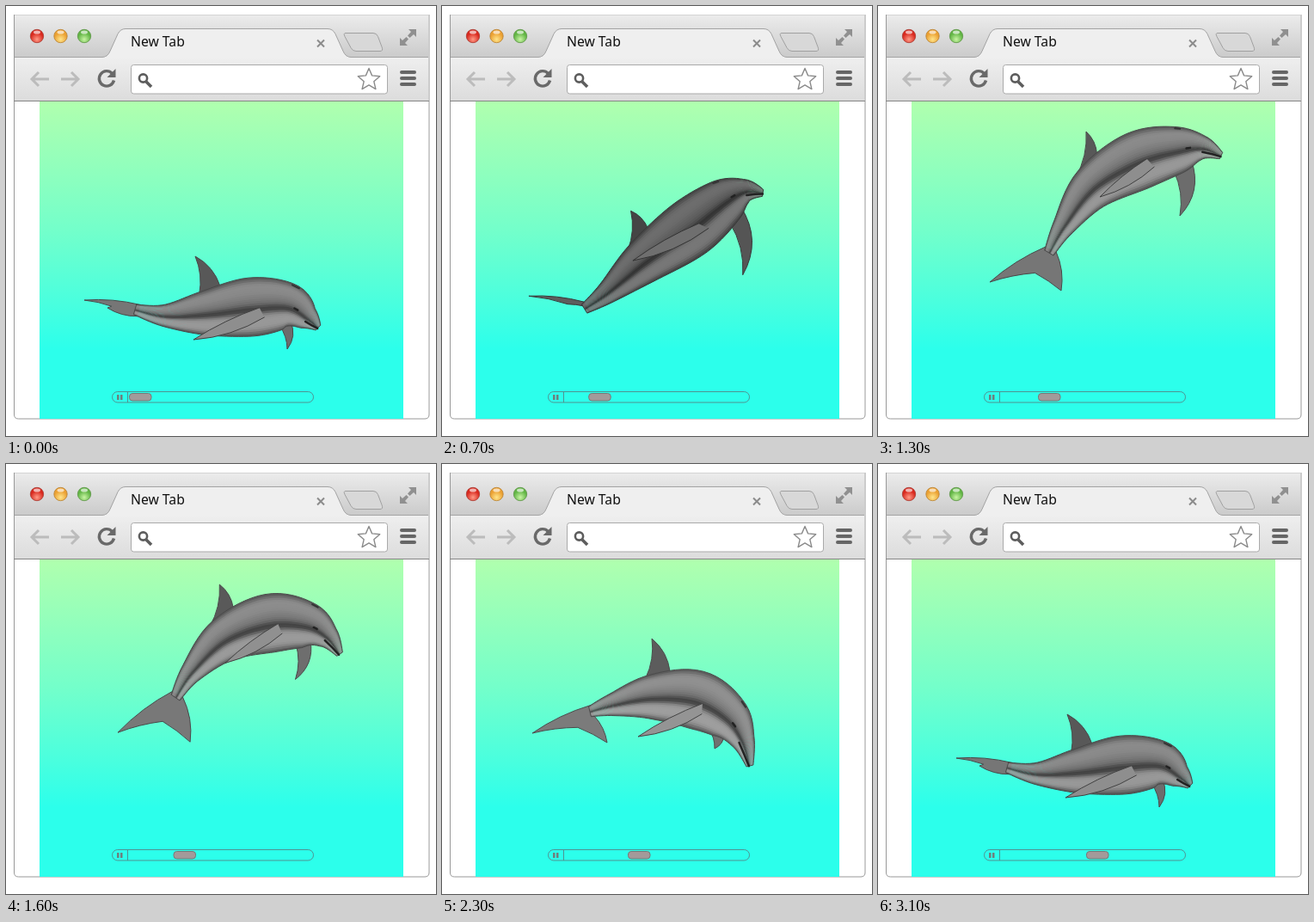
Animation of 500 by 500 pixels, one loop 3200 ms. Source, as an HTML page with a canvas:

```html
<!DOCTYPE html>
<html lang="en">
<head>
<meta charset="utf-8">
<title>New Tab</title>
<style>
  html, body { margin: 0; width: 100%; height: 100%; overflow: hidden; background: #fff; }
  svg, canvas { position: absolute; left: 0; top: 0; width: 500px; height: 500px; }
  text { font: 15.7px "Noto Sans", "Open Sans", sans-serif; }
</style>
</head>
<body>
<svg viewBox="0 0 500 500">
  <defs>
    <linearGradient id="titlebar" x2="0" y2="1"><stop stop-color="#ececec"/><stop offset="1" stop-color="#cbcbcb"/></linearGradient>
    <linearGradient id="toolbar" x2="0" y2="1"><stop stop-color="#efefef"/><stop offset="1" stop-color="#dcdcdc"/></linearGradient>
    <linearGradient id="sea" x2="0" y2="1">
      <stop stop-color="#b0ffae"/><stop offset=".4" stop-color="#74ffca"/>
      <stop offset=".62" stop-color="#4cffdd"/><stop offset=".78" stop-color="#2cffeb"/>
    </linearGradient>
    <radialGradient id="red" cy=".75"><stop stop-color="#ff9a86"/><stop offset="1" stop-color="#d9291f"/></radialGradient>
    <radialGradient id="amber" cy=".75"><stop stop-color="#ffe58a"/><stop offset="1" stop-color="#eba032"/></radialGradient>
    <radialGradient id="green" cy=".75"><stop stop-color="#c9f5a4"/><stop offset="1" stop-color="#62b545"/></radialGradient>
  </defs>

  <path d="M9.5 10V475q0 5 5 5H487q5 0 5-5V10" fill="#fff" stroke="#999"/>
  <path d="M39 111H462V480H39z" fill="url(#sea)"/>
  <path d="M10 10H491V59H10z" fill="url(#titlebar)"/>
  <path d="M10 10.5H491" stroke="#d4d4d4"/>
  <path d="M10 59H491V110H10z" fill="url(#toolbar)"/>
  <path d="M10 59.5H112q6 0 9-7l9-20q3-6 9-6H374q6 0 9 6l9 20q3 7 9 7H491" fill="#efefef" stroke="#a3a3a3"/>
  <path d="M115 60H398" stroke="#efefef" stroke-width="2"/>
  <path d="M9 110.5H492" stroke="#858585"/>

  <g stroke-width=".8">
    <circle cx="36" cy="35" r="7.7" fill="url(#red)" stroke="#a63a32"/>
    <circle cx="63.500" cy="35" r="7.700" fill="url(#amber)" stroke="#b58134"/>
    <circle cx="91" cy="35" r="7.7" fill="url(#green)" stroke="#5e9447"/>
    <g fill="#fff" opacity=".65">
      <ellipse cx="36" cy="30.500" rx="4" ry="2"/><ellipse cx="63.500" cy="30.500" rx="4" ry="2"/><ellipse cx="91" cy="30.500" rx="4" ry="2"/>
    </g>
  </g>
  <text x="145" y="47" fill="#111">New Tab</text>
  <path d="M362 39.500l8 8m0-8l-8 8" stroke="#8b8b8b" stroke-width="2"/>
  <path d="M395 31.500H427q4 0 5.500 4l4.500 12q2 5-2 5H407q-4 0-6-4l-7-13q-2-4 1-4z" fill="#d8d8d8" stroke="#a0a0a0"/>
  <g fill="#909090">
    <path d="M477 27v9l-3-3-4.500 4-2.500-2.500 4-4.500-3-3zM458 46v-9l3 3 4.500-4 2.500 2.500-4 4.500 3 3z"/>
  </g>

  <g fill="none" stroke="#bcbcbc" stroke-width="3">
    <path d="M50 85H30M38 77l-8 8 8 8M64 85H84M76 77l8 8-8 8"/>
  </g>
  <path d="M123.500 78.500a8.700 8.700 0 1 0 2 8" fill="none" stroke="#696969" stroke-width="3.400"/>
  <path d="M127.500 73v10h-10z" fill="#696969"/>
  <rect x="145.500" y="68.500" width="298" height="33.500" rx="3" fill="#fff" stroke="#aaa"/>
  <path d="M163 88l6 6" stroke="#5d5d5d" stroke-width="3.500"/>
  <circle cx="159.500" cy="84" r="4.600" fill="none" stroke="#5d5d5d" stroke-width="2.600"/>
  <path d="M422 72.500l3.600 8.400 9.100.8-6.900 6 2.100 8.900-7.900-4.700-7.900 4.700 2.100-8.900-6.900-6 9.100-.8z" fill="#fff" stroke="#8a8a8a" stroke-width="1.400" stroke-linejoin="round"/>
  <path d="M460 77H475M460 84H475M460 91H475" stroke="#666" stroke-width="4" stroke-linecap="round"/>

  <g fill="none" stroke="#4f9391">
    <rect x="123.500" y="448.500" width="234" height="12.500" rx="6.250"/>
    <path d="M141.500 449V461"/>
  </g>
  <path d="M129 452h2.500v6H129zM133 452h2.500v6H133z" fill="#6f7f7f"/>
  <rect id="thumb" y="450.500" width="25.500" height="8.500" rx="3.500" fill="#a39a9a" stroke="#777"/>
</svg>
<canvas width="500" height="500"></canvas>

<script>
const FRAME = 100, LOOP = 3200;
const ctx = document.querySelector("canvas").getContext("2d");
const thumb = document.getElementById("thumb");

// spine runs from tail to beak; fins: two fluke tips, dorsal, near flipper, far flipper
const poses = [
  { at: 0, thumb: 143, light: 1,
    spine: [150,353, 185,360, 232,357, 285,350, 328,349, 351,363, 363,374],
    fins: [91,342, 118,351, 220,291, 218,388, 327,399] },
  { at: 400, thumb: 160, light: .82,
    spine: [145,363, 178,365, 228,339, 280,312, 322,294, 350,291, 367,299],
    fins: [92,345, 118,357, 215,280, 228,349, 337,367] },
  { at: 900, thumb: 177, light: .76,
    spine: [181,338, 203,307, 241,266, 294,224, 336,188, 358,174, 379,174],
    fins: [109,331, 196,342, 225,206, 222,262, 356,278] },
  { at: 1300, thumb: 186, light: 1,
    spine: [199,287, 216,256, 250,211, 302,180, 350,167, 378,165, 399,174],
    fins: [130,321, 213,331, 242,146, 258,222, 351,244] },
  { at: 1900, thumb: 203, light: 1.03,
    spine: [190,267, 212,241, 256,214, 308,207, 346,222, 365,250, 372,279],
    fins: [124,306, 210,318, 251,151, 244,256, 322,271] },
  { at: 2300, thumb: 216, light: 1.04,
    spine: [172,288, 198,280, 244,271, 295,274, 332,295, 350,322, 358,351],
    fins: [105,313, 192,324, 244,203, 228,317, 317,331] }
];
poses.push({ ...poses[0], at: 3100, thumb: 242 });

const girth = [6, 13, 26, 34, 27, 14, 4];
const tones = [85, 132, 138, 128, 108, 66, 138, 152, 140, 82];

const mix = (a, b, t) => a + (b - a) * t;
const grey = v => `rgb(${v},${v},${v})`;

function hermite(a, b, slopeA, slopeB, t) {
  const t2 = t * t, t3 = t2 * t;
  return a * (2 * t3 - 3 * t2 + 1) + b * (3 * t2 - 2 * t3)
    + slopeA * (t3 - 2 * t2 + t) + slopeB * (t3 - t2);
}

// Smooth curve through evenly spaced values
function along(values, u) {
  const last = values.length - 1, i = Math.min(Math.floor(u), last - 1);
  const slope = k => (values[Math.min(k + 1, last)] - values[Math.max(k - 1, 0)]) / 2;
  return hermite(values[i], values[i + 1], slope(i), slope(i + 1), u - i);
}

function poseAt(time) {
  const last = poses.length - 1;
  let i = 0;
  while (i < last - 1 && time >= poses[i + 1].at) i++;
  const a = poses[i], b = poses[i + 1], span = b.at - a.at, t = Math.min((time - a.at) / span, 1);
  const slope = (k, list, n) => {
    if (k === last) return 0;
    const next = poses[k + 1], prev = k ? poses[k - 1] : { ...poses[last], at: poses[last].at - LOOP };
    return span * (next[list][n] - prev[list][n]) / (next.at - prev.at);
  };
  const points = list => {
    const flat = a[list].map((v, n) => hermite(v, b[list][n], slope(i, list, n), slope(i + 1, list, n), t));
    return flat.flatMap((v, n) => n % 2 ? [] : [[v, flat[n + 1]]]);
  };
  return {
    spine: points("spine"), fins: points("fins"),
    thumb: mix(a.thumb, b.thumb, t), light: mix(a.light, b.light, t)
  };
}

// Each edge bows sideways by a share of its length
function shape(points, bows, fill) {
  ctx.beginPath();
  ctx.moveTo(...points[0]);
  bows.forEach((bow, i) => {
    const [x0, y0] = points[i], [x1, y1] = points[i + 1];
    ctx.quadraticCurveTo((x0 + x1) / 2 + (y1 - y0) * bow, (y0 + y1) / 2 - (x1 - x0) * bow, x1, y1);
  });
  ctx.fillStyle = fill;
  ctx.fill();
  ctx.stroke();
}

function drawDolphin({ spine, fins, light }) {
  const xs = spine.map(p => p[0]), ys = spine.map(p => p[1]);
  const shade = v => grey(Math.round(Math.min(v * light, 255)));
  const [flukeA, flukeB, dorsal, near, far] = fins;

  // u: tail 0 to beak 6; k: back 1 to belly -1
  function skin(u, k) {
    const x = along(xs, u), y = along(ys, u), from = Math.max(u - .05, 0), to = Math.min(u + .05, 6);
    const dx = along(xs, to) - along(xs, from), dy = along(ys, to) - along(ys, from);
    const reach = k * along(girth, u) / Math.hypot(dx, dy);
    return [x + dy * reach, y - dx * reach];
  }
  const edge = k => Array.from({ length: 49 }, (_, i) => skin(i / 8, k));
  function trace(points) {
    ctx.beginPath();
    points.forEach(p => ctx.lineTo(...p));
  }
  function line(points, width, color) {
    trace(points);
    ctx.lineWidth = width;
    ctx.strokeStyle = color;
    ctx.stroke();
  }

  ctx.lineJoin = ctx.lineCap = "round";
  ctx.lineWidth = 1;
  ctx.strokeStyle = shade(72);
  const notch = [0, 1].map(n => mix((flukeA[n] + flukeB[n]) / 2, spine[0][n], .4));
  shape([skin(.2, 1), flukeA, notch, flukeB, skin(.2, -1)], [-.08, .06, .05, -.15], shade(118));
  shape([skin(3.75, -.8), far, skin(4.4, -.7)], [.16, -.3], shade(108));
  shape([skin(1.9, .9), dorsal, skin(2.4, .95)], [-.15, .2], shade(88));

  const bands = 27;
  for (let i = 0; i < bands; i++) {
    const top = 1 - 2 * i / bands, bottom = Math.max(top - 3 / bands, -1);
    trace([...edge(top), ...edge(bottom).reverse()]);
    ctx.fillStyle = shade(along(tones, (i + .5) / bands * (tones.length - 1)));
    ctx.fill();
  }
  trace([...edge(1), ...edge(-1).reverse()]);
  ctx.closePath();
  ctx.stroke();

  ctx.strokeStyle = shade(65);
  shape([skin(3.2, -.05), near, skin(3.3, -.4)], [-.06, -.12], shade(142));

  line([skin(5, -.35), skin(5.5, -.4), skin(6, -.3)], 2.5, "#222");
  line([skin(4.25, 0), skin(4.4, 0)], 2.5, "#222");
  line([skin(4, .93), skin(4.15, .93)], 2, "#333");
}

function render(now) {
  const time = Math.floor(now % LOOP / FRAME) * FRAME;
  const pose = poseAt(time);
  ctx.clearRect(0, 0, 500, 500);
  drawDolphin(pose);
  thumb.setAttribute("x", pose.thumb + .5);
}

let start;
function tick(now) {
  start ??= now;
  render(now - start);
  requestAnimationFrame(tick);
}
render(0);
requestAnimationFrame(tick);
</script>
</body>
</html>
```
